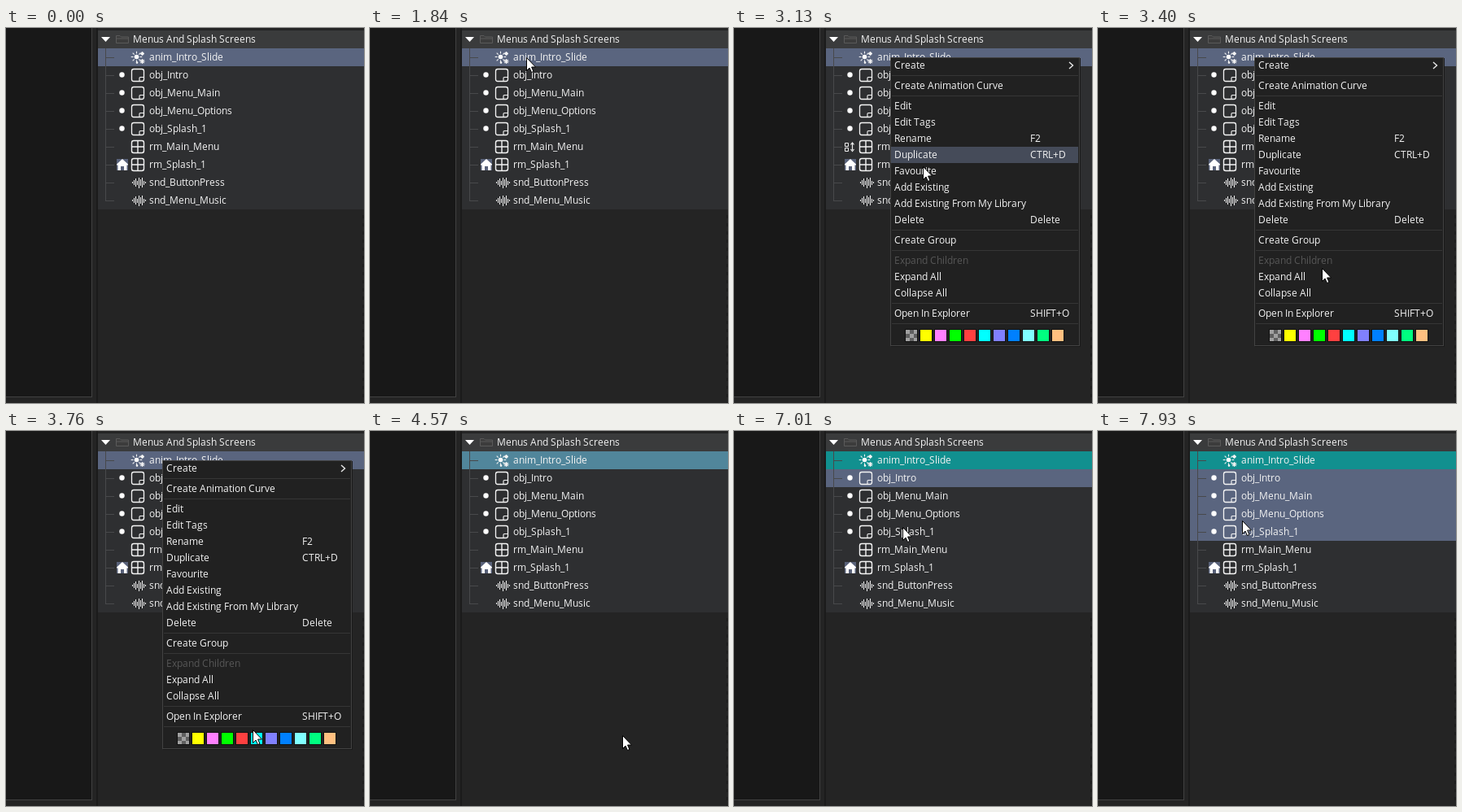
Write an HTML page that moves like this. It is 440x461 px and loops after 8 s.

```html
<!DOCTYPE html>
<html lang="en">
<head>
<meta charset="utf-8">
<title>Asset browser</title>
<style>
  html, body { margin: 0; width: 100%; height: 100%; overflow: hidden; background: #242424; }
  svg { display: block; width: 440px; height: 461px; }
  text { font: 12px "Open Sans", sans-serif; fill: #f2f2f2; white-space: pre; }
  .off { fill: #565656; }
  .crisp { shape-rendering: crispEdges; }
</style>
</head>
<body>
<svg id="stage" viewBox="0 0 440 461"></svg>
<script>
const LOOP = 8000, STEP = 90, ROW = 22, TREE_TOP = 25;
const MENU_OPEN = 2490, MENU_CLOSE = 4570, CLICK = 6290, SHIFT_CLICK = 7470;
const PLAIN = '#2e2f31', SELECTED = '#5a657f', TINT_SELECTED = '#51869b', TINT = '#11908f';

const stage = document.getElementById('stage');
const pen = document.createElement('canvas').getContext('2d');
pen.font = '12px "Open Sans", sans-serif';

function add(parent, tag, attrs = {}, content) {
  const el = document.createElementNS('http://www.w3.org/2000/svg', tag);
  for (const key in attrs) el.setAttribute(key, attrs[key]);
  if (content) el.textContent = content;
  return parent.appendChild(el);
}
const group = (parent, x = 0, y = 0) => add(parent, 'g', { transform: `translate(${x} ${y})` });
const rect = (parent, x, y, width, height, fill) =>
  add(parent, 'rect', { x, y, width, height, fill, class: 'crisp' });
const path = (parent, d, fill = 'none', stroke = 'none', width = 1) =>
  add(parent, 'path', { d, fill, stroke, 'stroke-width': width });

// Glyph advances are rounded to whole pixels, like a bitmap UI font.
function label(parent, x, y, string, cls = '') {
  const places = [];
  for (const ch of string) {
    places.push(x);
    x += Math.round(pen.measureText(ch).width);
  }
  add(parent, 'text', { x: places.join(' '), y, class: cls }, string);
}

// Icons are drawn around their own centre.
const icons = {
  anim(g) {
    const burst = (x, y, r, core) => {
      for (let i = 0; i < 8; i++) {
        const c = Math.cos(i * Math.PI / 4), s = Math.sin(i * Math.PI / 4);
        path(g, `M${x + c * core} ${y + s * core}L${x + c * r} ${y + s * r}`, 'none', '#f4f4f4', 1.1);
      }
    };
    add(g, 'circle', { cx: -1.5, cy: -.5, r: 2.8, fill: '#fff' });
    burst(-1.5, -.5, 6.8, 4);
    burst(5.5, -4.5, 2.4, 0);
    burst(5.5, 5, 3, 0);
    burst(-1, 6.5, 1.2, 0);
  },
  object(g) {
    add(g, 'rect', { x: -7.5, y: -7.5, width: 15, height: 15, rx: 2.5, fill: 'none', stroke: '#f4f4f4', 'stroke-width': 1.3 });
    path(g, 'M2 7.5V3.5Q2 2.5 3 2.5H7.5', 'none', '#f4f4f4', 1.1);
    add(g, 'circle', { cx: -19.5, cy: -.5, r: 3.2, fill: '#fff' });
  },
  room(g) {
    add(g, 'rect', { x: -7.5, y: -7.5, width: 15, height: 15, rx: 2.5, fill: 'none', stroke: '#f4f4f4', 'stroke-width': 1.4 });
    path(g, 'M0-7V7M-7 0H7', 'none', '#f4f4f4', 1.4);
  },
  home(g) {
    icons.room(g);
    rect(g, -26, -7, 14, 14, '#59627a');
    path(g, 'M-26-.5L-19-7L-12-.5V.5H-13.5V7H-17V2H-21V7H-24.5V.5H-26Z', '#fff');
  },
  sound(g) {
    [2, 6, 10, 5, 13, 8, 12, 5, 2].forEach((h, i) => rect(g, -7 + 2 * i, -Math.floor(h / 2), 1, h, '#f0f0f0'));
  }
};

// Window chrome
rect(stage, 0, 0, 440, 461, '#242424');
rect(stage, 0, 0, 105, 453, '#181818');
rect(stage, 105, 0, 1, 454, '#414141');
rect(stage, 0, 453, 106, 1, '#414141');
rect(stage, 111, 0, 2, 461, '#1b1b1b');
rect(stage, 113, 3, 327, 22, '#3a3b3c');
path(stage, 'M117 11H128L122.5 17Z', '#fff');
path(stage, 'M135.5 18.5V9.5H140L141.5 11H150.5V18.5ZM135.5 13H150.5', '#3c3c3c', '#5a5a5a');
label(stage, 156, 18, 'Menus And Splash Screens');
path(stage, 'M439 230V461', 'none', '#1d1d1d', 2).setAttribute('stroke-dasharray', '4 6');

// Asset tree
const assets = [
  ['anim', 'anim_Intro_Slide'], ['object', 'obj_Intro'], ['object', 'obj_Menu_Main'],
  ['object', 'obj_Menu_Options'], ['object', 'obj_Splash_1'], ['room', 'rm_Main_Menu'],
  ['home', 'rm_Splash_1'], ['sound', 'snd_ButtonPress'], ['sound', 'snd_Menu_Music']
];
const rows = assets.map(([icon, name], i) => {
  const y = TREE_TOP + i * ROW, bar = rect(stage, 113, y, 327, ROW, PLAIN);
  rect(stage, 122, y, 1, i === assets.length - 1 ? 12 : ROW, '#48494b');
  rect(stage, 122, y + 11, 11, 1, '#48494b');
  icons[icon](group(stage, 162, y + 11));
  label(stage, 176, y + 15, name);
  return bar;
});

const orderIcon = group(stage, 136, 140);
for (const y of [1, 7]) path(orderIcon, `M.5 ${y}.5h4v4h-4Z`, 'none', '#f0f0f0');
path(orderIcon, 'M9.5 2V10M7.5 3.5L9.5 1L11.5 3.5M7.5 9L9.5 11.5L11.5 9', 'none', '#f0f0f0', 1.2);

// Context menu
const menu = group(stage);
rect(menu, 193, 37, 233, 355, '#1a1a1a');
rect(menu, 192, 36, 233, 355, '#424242');
rect(menu, 193, 37, 231, 353, '#212121');
const highlight = rect(menu, 193, 0, 230, 20, '#454b59');
const items = [
  ['Create'], 0, ['Create Animation Curve'], 0, ['Edit'], ['Edit Tags'], ['Rename', 'F2'],
  ['Duplicate', 'CTRL+D'], ['Favourite'], ['Add Existing'], ['Add Existing From My Library'],
  ['Delete', 'Delete'], 0, ['Create Group'], 0, ['Expand Children'], ['Expand All'],
  ['Collapse All'], 0, ['Open In Explorer', 'SHIFT+O'], 0
];
const itemTops = [];
let top_ = 36;
for (const item of items) {
  if (!item) {
    rect(menu, 194, top_ + 2, 229, 1, '#363636');
    top_ += 5;
    continue;
  }
  const disabled = item[0] === 'Expand Children';
  label(menu, 197, top_ + 14, item[0], disabled ? 'off' : '');
  if (item[1]) label(menu, 364, top_ + 14, item[1]);
  if (!disabled) itemTops.push(top_);
  top_ += 20;
}
path(menu, 'M412 42L416.5 46L412 50', 'none', '#e8e8e8', 1.4);
const swatches = ['#606060', '#ffff00', '#ff80ff', '#00ff00', '#ff4040', '#00ffff',
  '#8080ff', '#0080ff', '#80ffff', '#00ff80', '#ffc080'];
swatches.forEach((color, i) => {
  rect(menu, 210 + 18 * i, 370, 16, 16, '#111');
  rect(menu, 211 + 18 * i, 371, 14, 14, color);
});
for (let i = 0; i < 9; i += 2) rect(menu, 211 + i % 3 * 5, 371 + Math.floor(i / 3) * 5, i % 3 === 2 ? 4 : 5, i > 5 ? 4 : 5, '#a0a0a0');

const cursor = group(stage);
path(cursor, 'M.5 .5V16.5L4 13L6.5 18.5L9 17.5L6.6 12H11.5Z', '#fff', '#000');

// Pointer moves: first step time, step count, destination, easing
const ease = {
  linear: u => u,
  in: u => u ** 1.5,
  out: u => 1 - (1 - u) ** 1.5,
  both: u => u * u * (3 - 2 * u)
};
const SHOW = 1120, HOME = [33, 148];
const moves = [
  [1210, 8, 192, 36, 'out'], [2950, 3, 232, 170, 'in'], [3220, 6, 299, 363, 'out'],
  [3760, 1, 303, 367, 'linear'], [3850, 2, 310, 371, 'linear'], [4120, 2, 310, 373, 'linear'],
  [4390, 1, 310, 374, 'linear'], [4940, 9, 155, 95, 'both'], [5750, 6, 196, 53, 'out'],
  [6470, 4, 217, 95, 'in'], [6830, 5, 203, 126, 'out'], [7750, 3, 177, 110, 'out']
];

// The pointer advances in steps; a lag gives the position the menu reacts to.
function pointer(t, lag = 0) {
  let [x, y] = HOME;
  for (const [start, steps, toX, toY, kind] of moves) {
    if (t < start) break;
    const done = Math.floor((t - start) / STEP) + 1 - lag / STEP;
    const k = ease[kind](Math.min(1, done / steps));
    x += (toX - x) * k;
    y += (toY - y) * k;
  }
  return [x, y];
}

const show = (el, on) => el.setAttribute('visibility', on ? 'visible' : 'hidden');

function rowColor(i, t) {
  if (i === 0) return t < MENU_CLOSE ? SELECTED : t < CLICK ? TINT_SELECTED : TINT;
  const last = t >= SHIFT_CLICK ? 4 : t >= CLICK ? 1 : 0;
  return i <= last ? SELECTED : PLAIN;
}

function render(t) {
  const [x, y] = pointer(t);
  cursor.setAttribute('transform', `translate(${Math.round(x)} ${Math.round(y)})`);
  show(cursor, t >= SHOW);

  const open = t >= MENU_OPEN && t < MENU_CLOSE;
  const [hoverX, hoverY] = pointer(t, 30);
  const hot = itemTops.find(top => hoverX > 192 && hoverY >= top && hoverY < top + 20);
  show(menu, open);
  show(highlight, open && hot !== undefined);
  if (hot !== undefined) highlight.setAttribute('y', hot);
  show(orderIcon, open && hoverY >= 135 && hoverY < 157);
  rows.forEach((bar, i) => bar.setAttribute('fill', rowColor(i, t)));
}

const began = performance.now();
function tick() {
  render((performance.now() - began) % LOOP);
  requestAnimationFrame(tick);
}
tick();
</script>
</body>
</html>
```
